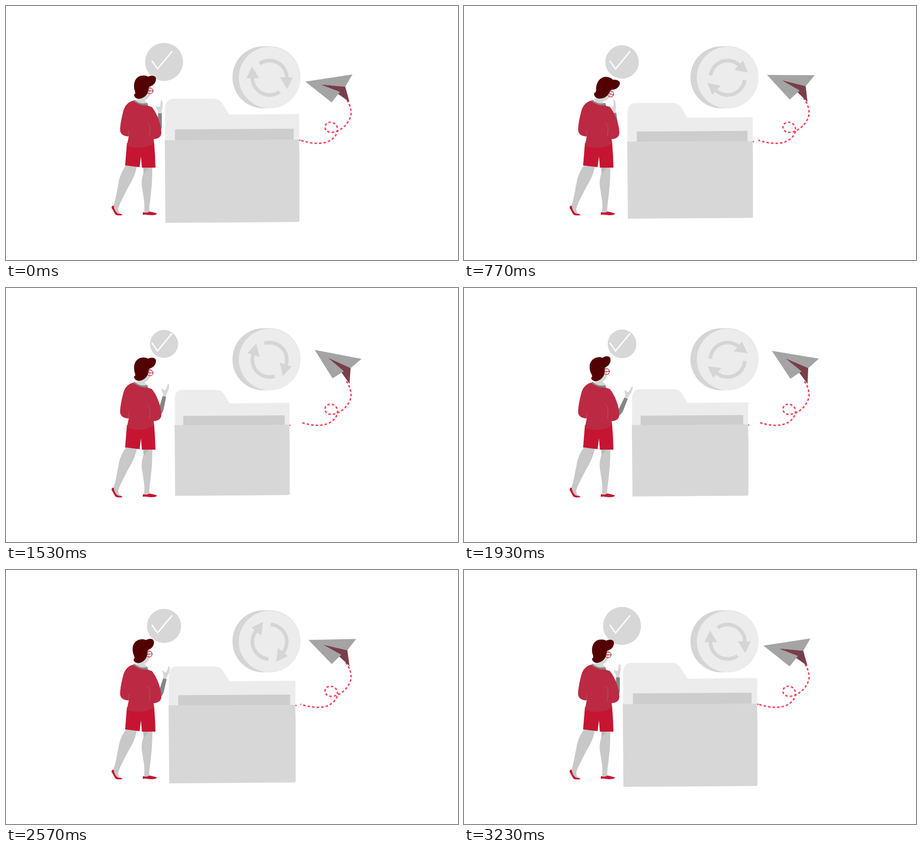
An HTML page that plays this animation: 998 px wide and 561 px high, repeating every 3270 ms.

```html
<!DOCTYPE html>
<html lang="en">
<head>
<meta charset="utf-8">
<title>Folder and paper plane</title>
<style>
  html, body { margin: 0; width: 100%; height: 100%; overflow: hidden; background: #fff; }
  svg { display: block; width: 100%; height: 100%; }
</style>
</head>
<body>
<svg viewBox="0 0 998 561">
  <circle id="badge" cx="349" cy="123.5" r="42" fill="#d7d7d7"/>
  <path d="M322 121L334.500 139L367 100" fill="none" stroke="#fff" stroke-width="3"/>

  <rect x="500" y="89" width="150" height="137" rx="68" fill="#d5d5d5"/>
  <circle cx="582" cy="158" r="68" fill="#ececec"/>
  <g id="arrows" fill="#d5d5d5">
    <g id="arrow">
      <path d="M-22 -31A38 38 0 0 1 38 0" fill="none" stroke="#d5d5d5" stroke-width="8"/>
      <path d="M23 -1H51L39 25Z"/>
    </g>
    <use href="#arrow" transform="rotate(180)"/>
  </g>

  <path id="trail" fill="none" stroke="#f9425c" stroke-width="3.200" stroke-dasharray="5.5 4.500"
    d="M650 296.500C680 306 705 306 720 294C732 285 735 271 729 263C722 254 708 255 705 264C702 273 710 280 720 279C742 277 760 256 762 238C762 226 758 214 750 204"/>
  <g id="plane">
    <path d="M693 173L749 178L758.500 212L733 194L737 190Z" fill="#783f4b"/>
    <path d="M661 167L765 151L749 178.500L693 173L737 190L719 213Z" fill="#a4a4a4"/>
  </g>

  <g id="folder">
    <path d="M646 294.500L650.500 295.500V298H646Z" fill="#f9425c"/>
    <path d="M351 298V228C352 212 358 205 370 205H458C470 205 477 212 482 222L493 240L647.500 238.500V298Z" fill="#ececec"/>
    <path d="M373 272.500L635 271V298H373Z" fill="#cdcdcd"/>
    <path d="M350.500 296.500L647 295L648 333V473Q648 477 644 477L352 479Z" fill="#d7d7d7"/>
  </g>

  <g fill="#c8c8c8">
    <path d="M265 352L289 354C285 375 276 390 270 400C262 416 253 432 248 446C247 451 250 456 252 460L241 458L237 441C242 430 244 412 248 394C250 378 255 366 265 352Z"/>
    <path d="M303 355L323 356C323 380 322 398 320 412C319 430 315 442 317 456L306 458L305 452C307 436 303 420 301 405C298 390 300 378 304 368Z"/>
    <path d="M303 356H316L304 371Z" fill="#b9b9b9"/>
  </g>
  <g fill="#c61532">
    <path d="M236 441C232 442 233 447 235 449L241 460C244 463 250 463 257 462C256 459 252 458 248 459C243 456 239 450 238 442Z"/>
    <path d="M303 455C301 459 302 462 304 461C310 460 313 462 322 462C328 462 333 461 333 458C328 456 322 455 317 454C312 457 307 457 303 455Z"/>
    <path d="M267 303L263 352L295 356L298 332L300 357H330L329 330L327 301Z"/>
  </g>

  <g id="arm">
    <path d="M337 239L335 230C332 227 331 223 330.500 220L336 223L340 222L342 209C344 206 346 209 346 218C346 226 343 230 343 239Z" fill="#d7d7d7"/>
    <path d="M336 237H344V266C343 275 340 280 332 284Z" fill="#868686"/>
  </g>
  <g id="head">
    <path d="M295 185L291 205L286 209C292 217 304 218 312 215L306 208C314 206 318 198 319 190L320 178L305 170Z" fill="#d7d7d7"/>
    <path d="M283 195C286 195 286 191 284 186C280 170 286 157 298 154C304 153 309 153 314 156C320 153 329 153 331 159C332 168 327 175 317 178C314 180 316 184 314 188C312 197 303 205 293 205C287 205 282 200 283 195Z" fill="#530003"/>
    <path d="M312 187.500H326M313.500 183A6.500 6.500 0 1 1 313.500 192" fill="none" stroke="#c61532" stroke-width="1.300"/>
  </g>
  <path d="M281 209L284 207C292 215 302 217 312 214L314 221C300 222 290 217 281 209Z" fill="#868686"/>
  <path d="M281 209C268 212 261 222 258 236C254 252 252 264 252 274C252 283 261 288 271 288L267 308C280 315 310 316 327 303L326 294C334 294 343 290 343 280C343 262 333 236 322 223L312 220C300 220 290 217 281 209Z" fill="#bb2a42"/>
  <path d="M271.500 275L270 288M311 258C316 259 318 264 318 272L316.500 289" fill="none" stroke="#a8606c"/>
</svg>
<script>
  const LOOP = 3270, SWING = 817, LEAN = 2005;
  const el = id => document.getElementById(id);
  const [badge, arrows, trail, plane, folder, arm, head] =
    ["badge", "arrows", "trail", "plane", "folder", "arm", "head"].map(el);
  const ease = u => (1 - Math.cos(Math.PI * u)) / 2;
  const mix = (a, b, u) => a + (b - a) * ease(u);
  const set = (node, value) => node.setAttribute("transform", value);

  // rest -> a -> b -> rest
  function gesture(t, a, b) {
    if (t < SWING) return mix(0, a, t / SWING);
    if (t < LEAN) return mix(a, b, (t - SWING) / (LEAN - SWING));
    return mix(b, 0, (t - LEAN) / (LOOP - LEAN));
  }

  function draw(now) {
    const t = now % LOOP, turn = ease(t / LOOP), pulse = ease(2 * t / LOOP);
    badge.setAttribute("r", 42 * (1 - 0.265 * pulse));
    set(arrows, `translate(582 158.500) rotate(${-360 * turn})`);
    set(plane, `rotate(${19.7 * pulse} 759 212)`);
    set(folder, `translate(499.500 342) scale(${1 - 0.147 * pulse}) translate(-499.500 -342)`);
    set(head, `rotate(${gesture(t, 17, -9)} 298 210)`);
    set(arm, `rotate(${gesture(t, -9, 22)} 332 287)`);
    trail.setAttribute("stroke-dashoffset", -1.8 - 50 * turn);
    requestAnimationFrame(draw);
  }
  draw(0);
</script>
</body>
</html>
```
